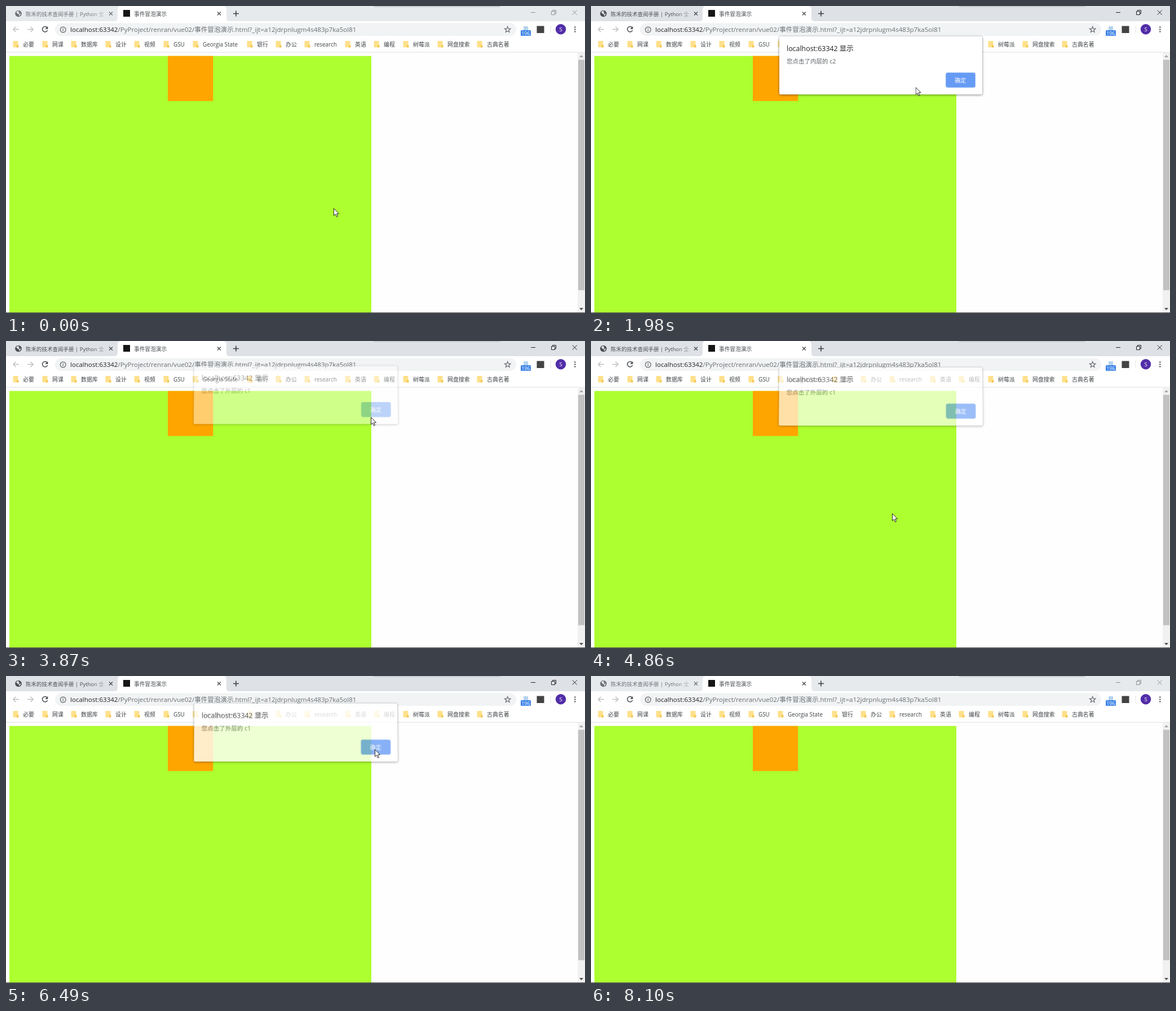
These frames come from a looping animation (1027 px wide and 545 px high, 8.16 s). An HTML page with a canvas:

```html
<!DOCTYPE html>
<html lang="zh-CN">
<head>
<meta charset="utf-8">
<title>事件冒泡演示</title>
<style>
  html, body { margin: 0; width: 100%; height: 100%; overflow: hidden; background: #fff; }
  body, button { font-family: "Open Sans", "Noto Sans CJK SC", "Noto Sans CJK", sans-serif; }
  canvas, .dialog, #cursor { position: absolute; left: 0; top: 0; }
  .dialog {
    left: 334px; top: 54px; width: 359.5px; height: 103px;
    background: #fff; border-radius: 2px; visibility: hidden;
    box-shadow: 0 1px 4px rgba(0, 0, 0, .45), 0 0 1px rgba(0, 0, 0, .35);
  }
  .dialog * { position: absolute; margin: 0; white-space: nowrap; }
  .dialog h1 { left: 13px; top: 12px; font-size: 12.4px; line-height: 19px; font-weight: 400; color: #202124; }
  .dialog p { left: 13px; top: 36px; font-size: 10.5px; line-height: 16px; color: #5f6368; }
  .dialog button {
    left: 295px; top: 64px; width: 52.5px; height: 27px; padding: 0;
    box-sizing: border-box; border: 1.5px solid #8cb4f8; border-radius: 3.5px;
    background: #669bf5; color: #fff; font-size: 10px; line-height: 24px;
  }
</style>
</head>
<body>
<canvas id="page" width="1027" height="545"></canvas>
<div class="dialog" id="inner"><h1>localhost:63342 显示</h1><p>您点击了内层的 c2</p><button>确定</button></div>
<div class="dialog" id="outer"><h1>localhost:63342 显示</h1><p>您点击了外层的 c1</p><button>确定</button></div>
<svg id="cursor" width="12" height="18" viewBox="-.5 -.5 12 18">
  <path d="M0 0V12.6L2.9 10 5 14.8 7 13.9 5 9.3H9Z" fill="#fff" stroke="#111" stroke-width=".9"/>
</svg>
<script>
const LOOP = 8160;
const $ = id => document.getElementById(id);
const c = $('page').getContext('2d');
const FONT = '"Open Sans", "Noto Sans CJK SC", "Noto Sans CJK", sans-serif';

function text(s, x, y, size, color) {
  c.font = `${size}px ${FONT}`;
  c.fillStyle = color;
  c.fillText(s, x, y);
  return x + c.measureText(s).width;
}

function rect(x, y, w, h, color) {
  c.fillStyle = color;
  c.fillRect(x, y, w, h);
}

function round(x, y, w, h, r, color) {
  c.fillStyle = color;
  c.beginPath();
  c.roundRect(x, y, w, h, r);
  c.fill();
}

function disc(x, y, r, color) {
  c.fillStyle = color;
  c.beginPath();
  c.arc(x, y, r, 0, 7);
  c.fill();
}

function stroke(d, color, width = 1) {
  c.strokeStyle = color;
  c.lineWidth = width;
  c.stroke(new Path2D(d));
}

function shape(d, color) {
  c.fillStyle = color;
  c.fill(new Path2D(d));
}

const cross = (x, y, r, color, w) =>
  stroke(`M${x - r} ${y - r}l${2 * r} ${2 * r}m0 ${-2 * r}l${-2 * r} ${2 * r}`, color, w);

function drawTabs(active) {
  const ink = active ? '#4a4e53' : '#6d7175';
  const ctl = active ? '#222' : '#8f9194';
  rect(0, 0, 1027, 27, active ? '#dee1e6' : '#e7eaed');
  round(652, -3, 225, 5, 2, '#c9ccd0');

  disc(22, 13.5, 5.8, ink);
  shape('M18 11q3-3 5-2l-1 2 2 1-2 3-2-2zM23 15l3-2 0 2-3 3z', '#e7eaed');
  const fade = c.createLinearGradient(152, 0, 177, 0);
  fade.addColorStop(0, ink);
  fade.addColorStop(1, ink + '30');
  text('陈禾的技术查阅手册 | Python 全', 35, 17.5, 9.5, fade);
  cross(186, 13.5, 3, ink, 1.3);

  shape('M192 27q6 0 6-6V6q0-6 6-6H385q6 0 6 6V21q0 6 6 6Z', '#fff');
  rect(208, 7, 12, 12, '#151515');
  text('事件冒泡演示', 227, 17.5, 9.7, '#45494d');
  cross(378, 13.5, 3, '#45494d', 1.3);
  stroke('M403 13.5h10M408 8.5v10', '#3c4043', 1.6);

  stroke('M931 11.5h8', ctl);
  stroke('M967.5 9.5h6v6h-6zM969.5 9.5v-2h6v6h-2', ctl);
  cross(1008.7, 11.5, 4, ctl);
}

function drawToolbar() {
  rect(0, 27, 1027, 55, '#fff');
  stroke('M23 41.5H13M17.5 36.8L12.8 41.5l4.7 4.7', '#bcbec1', 1.3);
  stroke('M38 41.5H48M43.5 36.8l4.7 4.7-4.7 4.7', '#bcbec1', 1.3);
  stroke('M73 38.4A4.7 4.7 0 1 0 73.6 43', '#4a4d51', 1.5);
  shape('M74.3 36v5h-5z', '#4a4d51');

  round(87, 30.5, 818, 22.5, 11.25, '#f1f3f4');
  stroke('M96.3 42a4.9 4.9 0 1 0 9.8 0a4.9 4.9 0 1 0-9.8 0M101.2 41v3.6M101.2 39v1.2', '#5f6368', 1.2);
  const x = text('localhost:63342', 114, 46, 11.55, '#202124');
  text('/PyProject/renran/vue02/事件冒泡演示.html?_ijt=a12jdrpnlugm4s483p7ka5ol81', x, 46, 11.55, '#6a6e72');

  let star = '';
  for (let i = 0; i < 10; i++) {
    const r = i % 2 ? 2.3 : 5.6, a = i * Math.PI / 5;
    star += `${i ? 'L' : 'M'}${889.7 + r * Math.sin(a)} ${42 - r * Math.cos(a)}`;
  }
  stroke(star + 'Z', '#5f6368', 1.1);

  rect(918, 36, 8, 8, '#b5d3ee');
  round(913, 43, 18, 10, 1.5, '#3b82e8');
  text('196', 914.2, 51.5, 9, '#fff');
  rect(941.5, 35.5, 13, 12.5, '#434343');
  rect(965.5, 35, 1, 13, '#e2e4e7');
  disc(984, 41.3, 9.2, '#512da8');
  text('S', 981.4, 45, 9.6, '#fff');
  for (const y of [37.5, 41.5, 45.5]) disc(1009.3, y, 1.2, '#505357');
}

const BOOKMARKS = [
  [12, '必要'], [64, '网课'], [115, '数据库'], [176, '设计'], [227, '视频'],
  [279, 'GSU'], [331, 'Georgia State'], [427, '银行'], [478, '办公'],
  [529, 'research'], [601, '英语'], [652, '编程'], [704, '树莓派'],
  [765, '网盘搜索'], [835, '古典名著']
];

function drawBookmarks() {
  for (const [x, name] of BOOKMARKS) {
    round(x + .5, 62, 9, 11.5, 1, '#ffe08a');
    shape(`M${x + 7} 73.5v-4h3.5v4z`, '#f3c64e');
    text(name, x + 18, 72, 9.9, '#3f4346');
  }
}

function drawContent() {
  rect(0, 82, 1027, 463, '#fefefe');
  rect(0, 81.6, 1027, 1, '#dfe0e2');
  rect(6, 88.7, 642, 457, '#adff2f');
  rect(287, 88.7, 80.3, 80, '#ffa500');
  rect(1014, 83, 13, 462, '#f1f1f1');
  rect(1015, 95.5, 11, 409, '#c1c1c1');
  shape('M1017 91h7l-3.5-4z', '#a3a3a3');
  shape('M1017 536h7l-3.5 4z', '#505050');
  rect(0, 544, 1027, 1, '#4d4d4d');
}

// Pointer path: time, x, y
const PATH = [
  [0, 581, 359], [50, 581, 359], [790, 338, 127], [1110, 338, 127],
  [1230, 329, 118], [1700, 329, 118], [1980, 575, 144], [2230, 632, 143],
  [2600, 649, 134], [3600, 649, 134], [3700, 647, 135], [3920, 647, 135],
  [4350, 537, 300], [4540, 534, 306], [5000, 534, 306], [5420, 612, 191],
  [5600, 630, 150], [5980, 654, 130], [6540, 654, 130], [6970, 701, 378],
  [7080, 726, 436], [7510, 750, 548], [LOOP, 750, 548]
];

const same = (a, b) => a[1] === b[1] && a[2] === b[2];

// Speed at a key: zero next to a rest, otherwise the mean of its neighbours
function slope(i, axis) {
  const a = PATH[i - 1], k = PATH[i], b = PATH[i + 1];
  if (!a || !b || same(a, k) || same(k, b)) return 0;
  return (b[axis] - a[axis]) / (b[0] - a[0]);
}

const clamp = v => Math.max(0, Math.min(1, v));
const smooth = u => u * u * (3 - 2 * u);

function pointer(t) {
  let i = 0;
  while (i < PATH.length - 2 && PATH[i + 1][0] <= t) i++;
  const a = PATH[i], b = PATH[i + 1], d = b[0] - a[0], u = (t - a[0]) / d;
  return [1, 2].map(n =>
    a[n] + (b[n] - a[n]) * smooth(u)
    + d * u * (1 - u) * (slope(i, n) * (1 - u) - slope(i + 1, n) * u));
}

const OPEN = 340, CLOSE = 240;

function presence(t, [from, to]) {
  const shown = 1 - (1 - clamp((t - from) / OPEN)) ** 3;
  return shown * (1 - clamp((t - to) / CLOSE));
}

// Open and close times of each dialog
const DIALOGS = [
  [$('inner'), [[1500, 2700]]],
  [$('outer'), [[2700, 3740], [4770, 6420]]]
];

function placeDialog(el, spans, t) {
  const p = Math.max(...spans.map(s => presence(t, s)));
  const off = 1 - p;
  el.style.visibility = p > 0 ? 'visible' : 'hidden';
  el.style.opacity = smooth(p);
  el.style.transform = off
    ? `translateY(${-18 * off}px) perspective(1000px) rotateX(${8 * off}deg) scale(${1 + .006 * off})`
    : 'none';
}

let wasActive;

function frame(now) {
  const t = now % LOOP;
  const active = t >= 1440 && t < 8100;
  if (active !== wasActive) {
    drawTabs(active);
    drawToolbar();
    drawBookmarks();
    drawContent();
    wasActive = active;
  }
  for (const [el, spans] of DIALOGS) placeDialog(el, spans, t);
  const [x, y] = pointer(t);
  $('cursor').style.transform = `translate(${x}px, ${y}px)`;
  requestAnimationFrame(frame);
}

requestAnimationFrame(frame);
</script>
</body>
</html>
```
